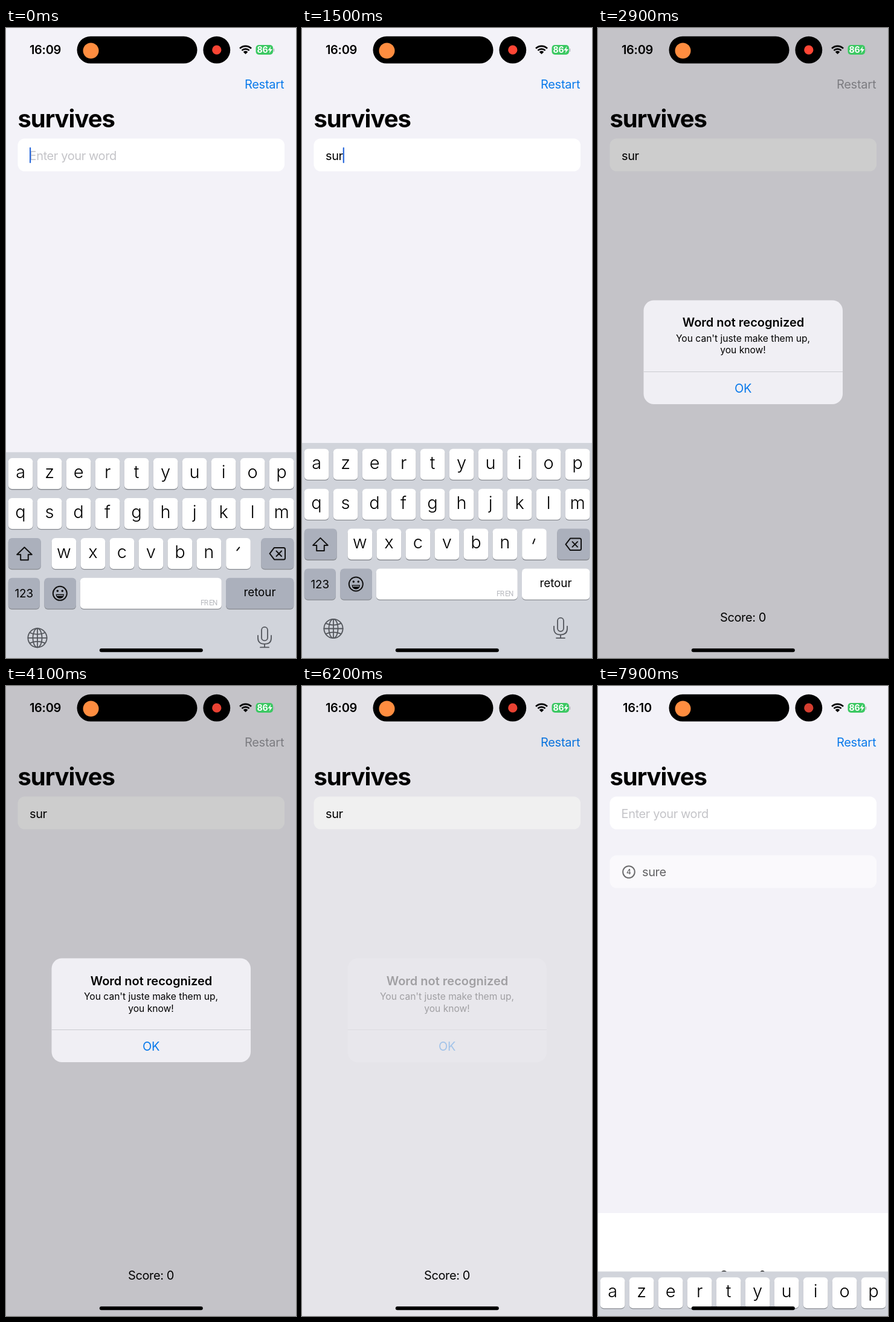
An HTML page for the animation above (8 s loop, 480 by 1040 pixels).

```html
<!DOCTYPE html>
<html lang="en">
<head>
<meta charset="utf-8">
<title>Word game</title>
<style>
  html, body { margin: 0; width: 100%; height: 100%; overflow: hidden; background: #f3f2f8; }
  svg { display: block; width: 100vw; height: 100vh; }
  text { font: 400 20px Inter, "Liberation Sans", sans-serif; letter-spacing: -.4px; }
  .mid { text-anchor: middle; }
  .end { text-anchor: end; }
  .bold { font-weight: 600; letter-spacing: -.3px; }
  .head { font-weight: 600; letter-spacing: 0; }
  .title { font-size: 40px; font-weight: 700; letter-spacing: -1px; }
  .note { font-size: 15.6px; letter-spacing: 0; }
  .level { font-size: 14px; font-weight: 700; letter-spacing: 0; fill: #fff; }
  .badge { font-size: 12px; font-weight: 500; letter-spacing: 0; }
  .letter { font-size: 29px; font-weight: 300; letter-spacing: 0; }
  .big { font-size: 44px; font-weight: 300; letter-spacing: 0; }
  .word { font-size: 18.8px; letter-spacing: 0; }
  .lang { font: 12px Roboto, "Liberation Sans", sans-serif; letter-spacing: -1px; fill: #b8babf; }
  .line { fill: none; stroke: #111; stroke-width: 2; stroke-linejoin: round; stroke-linecap: round; }
  .tool { stroke: #53565c; stroke-width: 1.8; }
</style>
</head>
<body>
<svg viewBox="0 0 480 1040" preserveAspectRatio="none">
  <rect width="480" height="1040" fill="#f3f2f8"/>
  <text id="restart" class="end" x="460.2" y="100" style="letter-spacing:-.25px">Restart</text>
  <text class="title" x="19.4" y="163.5">survives</text>
  <rect x="19.5" y="182.5" width="441.5" height="54" rx="11.5" fill="#fff"/>
  <text id="hint" x="38.6" y="217.5" fill="#c4c4c8">Enter your word</text>
  <text id="typed" x="39" y="217.5"></text>
  <rect id="caret" y="197" width="2.2" height="26" rx="1" fill="#2a69dc"/>

  <g id="row">
    <rect x="19.5" y="279.5" width="441.5" height="54" rx="11.5" fill="#fff"/>
    <circle class="line" cx="51" cy="307" r="9.8"/>
    <text class="badge mid" x="51" y="311.3">4</text>
    <text x="73" y="314">sure</text>
  </g>

  <rect id="band" y="870" width="480" height="170" fill="#fff"/>
  <text class="mid" x="240" y="979.5">Score: 0</text>
  <g id="board"></g>

  <rect id="dim" width="480" height="1040"/>
  <g id="alert">
    <rect x="75.5" y="449.5" width="329.5" height="171.5" rx="17" fill="#f0eff4"/>
    <path d="M75.5 567.5H405" stroke="#cbcbd0"/>
    <text class="mid head" x="240.5" y="493.5">Word not recognized</text>
    <text class="mid note" x="240" y="518">You can't juste make them up,</text>
    <text class="mid note" x="240" y="537.5">you know!</text>
    <text class="mid" x="240" y="601.5" fill="#0a7aeb">OK</text>
  </g>

  <text id="clock" class="mid bold" x="65" y="43.2"></text>
  <rect x="117.5" y="13.8" width="199" height="44.8" rx="22.4"/>
  <circle cx="140.5" cy="37.5" r="13" fill="#ff8d40"/>
  <circle cx="348.8" cy="36.2" r="22.4"/>
  <circle id="dot" cx="348.8" cy="36.2" r="7.6"/>
  <g id="wifi" transform="translate(396.5 43.2)"></g>
  <rect x="413.5" y="28" width="28.5" height="16" rx="5" fill="#3bc862"/>
  <path d="M443.4 34v5" stroke="#b4b4ba" stroke-width="1.6"/>
  <text class="level" x="415.5" y="41">86</text>
  <path d="M438.5 30l-5 7h3.3l-1.3 5 5.4-7h-3.5z" fill="#fff"/>
  <rect x="154.8" y="1024.2" width="171" height="6.1" rx="3"/>
</svg>
<script>
const $ = id => document.getElementById(id);
const LOOP = 8000, HEIGHT = 355, TAP = 120;
const SUBMIT = 1600, FOCUS = 6710, SUBMIT2 = 7712;
const taps = [["s", 430], ["u", 760], ["r", 1080], ["e", 7380]];
const rows = ["azertyuiop", "qsdfghjklm", "wxcvbn"];

const clamp = v => Math.max(0, Math.min(1, v));
const mix = (a, b, p) => `rgb(${a.map((v, i) => v + (b[i] - v) * p)})`;
const decay = (t, tau) => Math.exp(-t / tau);
const rowY = i => 9.8 + 65.9 * i;
const show = (id, on) => $(id).setAttribute("visibility", on ? "visible" : "hidden");

// Keyboard, drawn relative to its own top edge
const spots = {};
const cap = (x, y, w, fill = "#fff", id = "") =>
  `<rect x="${x}" y="${y + 1.3}" width="${w}" height="51" rx="6" fill="#898c92"/>
   <rect id="${id}" x="${x}" y="${y}" width="${w}" height="51" rx="6" fill="${fill}"/>`;
const label = (x, y, s, cls) => `<text class="mid ${cls}" x="${x}" y="${y}">${s}</text>`;
const line = (d, cls = "") => `<path class="line ${cls}" d="${d}"/>`;
const GREY = "#abb0bc";

let keys = `<rect width="480" height="${HEIGHT}" fill="#d1d4db"/>`;
rows.forEach((row, r) => [...row].forEach((ch, c) => {
  const x = (r == 2 ? 75.6 : 3.8) + 48 * c, y = rowY(r);
  spots[ch] = [x, y];
  keys += cap(x, y, 40.6) + label(x + 20.3, y + 32.8, ch, "letter");
}));
const y3 = rowY(2), y4 = rowY(3);
keys += cap(364.2, y3, 40.6)
  + `<path id="acute" class="line" d="M382.3 ${y3 + 20.5}l4-5"/>
     <path id="apos" class="line" d="M382.3 ${y3 + 24.5}l3-7.5"/>`
  + cap(3.8, y3, 54, GREY) + line(`M30.5 ${y3 + 15.3}l12.3 12h-6v9h-12.6v-9h-6z`)
  + cap(422.3, y3, 54, GREY)
  + line(`M444 ${y3 + 16}h15.5q2.5 0 2.5 2.5v14.5q0 2.5-2.5 2.5h-15.5l-7.5-9.7zM447.5 ${y3 + 21.5}l8.5 8.5m0-8.5l-8.5 8.5`)
  + cap(3.8, y4, 52, GREY) + label(29.8, y4 + 32.5, "123", "word")
  + cap(63.4, y4, 52.6, GREY)
  + `<circle class="line" cx="89.3" cy="${y4 + 25.5}" r="11.5"/>
     <path d="M82.5 ${y4 + 27}h13.6q-.6 7-6.8 7t-6.8-7z"/>
     <path d="M84 ${y4 + 29}h10.6" stroke="${GREY}" stroke-width="1.5"/>
     <circle cx="85.3" cy="${y4 + 21.5}" r="1.7"/><circle cx="93.3" cy="${y4 + 21.5}" r="1.7"/>`
  + cap(122.8, y4, 234) + `<text class="lang end" x="349.4" y="${y4 + 45}">FR EN</text>`
  + cap(364, y4, 112.3, GREY, "enter") + label(420, y4 + 30.5, "retour", "word")
  + `<g transform="translate(52 306.5)"><circle class="line tool" r="15.6"/>
     <ellipse class="line tool" rx="7.6" ry="15.6"/>
     ${line("M0-15.6v31.2M-15.6 0h31.2M-12.5-8.6q12.5 5.4 25 0M-12.5 8.6q12.5-5.4 25 0", "tool")}</g>`
  + `<g transform="translate(428 288.6)"><rect class="line tool" x="-5" width="10" height="22.5" rx="5"/>
     ${line("M-11 14v4q0 10 11 10t11-10v-4M0 28v5.5M-7 33.5h14", "tool")}</g>`
  + `<g id="popup"><path fill="#fff" style="filter:drop-shadow(0 1px 2px #0005)"
       d="M-10-84H51q12 0 12 12v44q0 9-10 15t-12.4 15v43q0 6-6 6h-28q-6 0-6-6v-43q-2-9-12.6-15t-10.5-15v-44q0-12 12.5-12z"/>
     <text id="preview" class="mid big" x="20.3" y="-35"></text></g>`;
$("board").innerHTML = keys;

const arc = r => { const k = r * .7071; return `M${-k} ${-k}A${r} ${r} 0 0 1 ${k} ${-k}`; };
$("wifi").innerHTML = `<path d="${arc(13.4)}${arc(8.6)}" fill="none" stroke="#000" stroke-width="2.7"/>
  <path d="${arc(5.4)}L0 0z"/>`;

function boardTop(t) {
  const away = t < SUBMIT ? decay(t + 329, 105)
    : t < FOCUS ? 1 - decay(t - SUBMIT, 120)
    : t < SUBMIT2 ? decay(t - FOCUS, 105)
    : 1 - decay(t - SUBMIT2, 120);
  return 1040 - HEIGHT + HEIGHT * away;
}

function draw(t) {
  const within = (a, b) => t >= a && t < b;

  const text = t < SUBMIT2 ? taps.filter(k => t >= k[1] + TAP).map(k => k[0]).join("") : "";
  $("typed").textContent = text;
  show("hint", !text);
  show("caret", t < SUBMIT || within(FOCUS, SUBMIT2));
  $("caret").setAttribute("x", 39 + (text ? $("typed").getComputedTextLength() : 0));
  $("row").setAttribute("opacity", clamp((t - SUBMIT2) / 320));

  $("board").setAttribute("transform", `translate(0 ${boardTop(t)})`);
  show("band", t >= 7850);
  show("acute", !text);
  show("apos", text);
  $("enter").setAttribute("fill", within(1440, 1580) || within(7600, 7690) ? "#fff" : GREY);
  const tap = taps.find(k => within(k[1], k[1] + TAP));
  show("popup", tap);
  if (tap) {
    $("popup").setAttribute("transform", `translate(${spots[tap[0]]})`);
    $("preview").textContent = tap[0];
  }

  const shown = t < 1850 ? 0 : t < 6020 ? 1 - decay(t - 1850, 150) : t < 6700 ? decay(t - 6020, 150) : 0;
  const scale = t < 6020 ? 1 + .15 * (1 - shown) : 1;
  $("dim").setAttribute("opacity", .195 * shown);
  $("alert").setAttribute("opacity", shown);
  $("alert").setAttribute("transform", `translate(240 535) scale(${scale}) translate(-240 -535)`);
  $("restart").setAttribute("fill", mix([10, 122, 235], [154, 154, 160], clamp((shown - .3) / .7)));

  $("clock").textContent = t < 6900 ? "16:09" : "16:10";
  const glow = clamp(.5 - .8 * Math.cos((t - 950) / 1400 * 2 * Math.PI));
  $("dot").setAttribute("fill", mix([212, 62, 48], [255, 70, 53], glow));
}

const start = performance.now();
function tick() {
  draw((performance.now() - start) % LOOP);
  requestAnimationFrame(tick);
}
tick();
</script>
</body>
</html>
```
